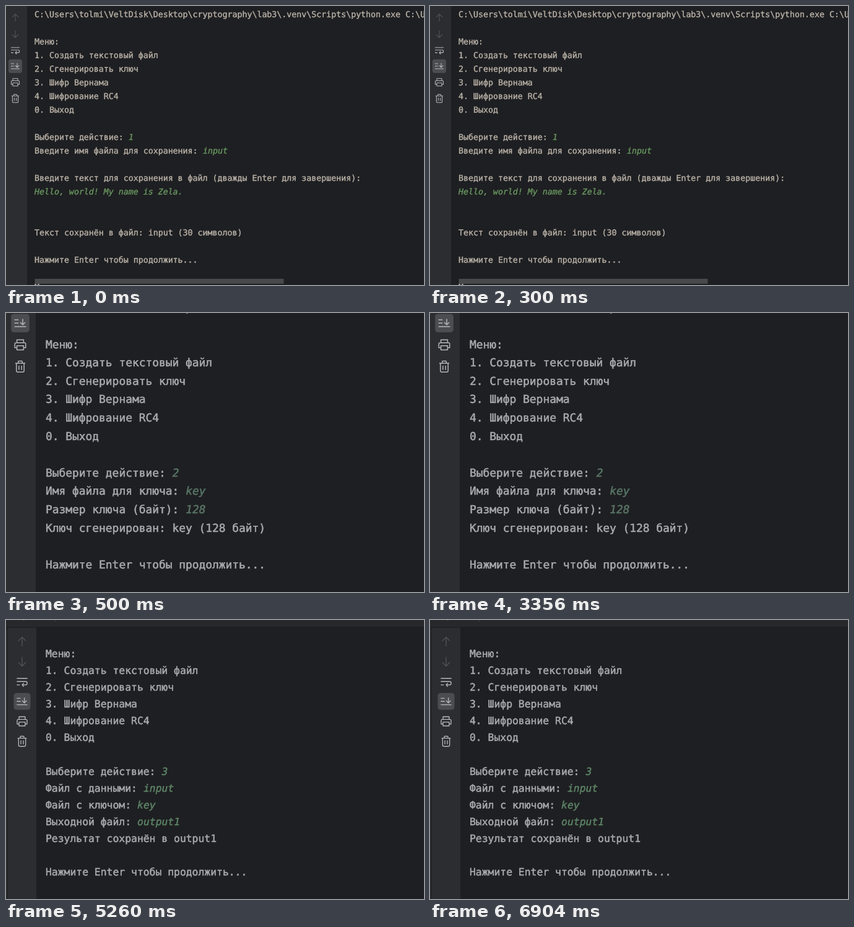
Write an HTML page with a canvas that moves like this. It is 675x450 px and loops after 8000 ms.

```html
<!DOCTYPE html>
<html lang="ru">
<head>
<meta charset="utf-8">
<title>Консоль</title>
<style>
  html, body { margin: 0; width: 100%; height: 100%; overflow: hidden; background: #1e1f22; }
  canvas { display: block; }
</style>
</head>
<body>
<canvas id="stage" width="675" height="450"></canvas>
<script>
const W = 675, H = 450, LOOP = 8000;
const ctx = document.getElementById('stage').getContext('2d');
const ADVANCE = 0.602; // monospace cell width in em
const WEIGHT = 0.03;   // extra stroke in em, for a sturdier face

const menu = [
  'Меню:',
  '1. Создать текстовый файл',
  '2. Сгенерировать ключ',
  '3. Шифр Вернама',
  '4. Шифрование RC4',
  '0. Выход',
  ''
];
const pause = 'Нажмите Enter чтобы продолжить...';
const path = String.raw`C:\Users\tolmi\VeltDisk\Desktop\cryptography\lab3\.venv\Scripts\python.exe C:\Users`;

// A line is plain text, or [prompt, typed answer].
const scenes = [
  {
    start: 0, x: 46, cell: 8, base: 17.6, step: 22,
    ink: '#b9b1a7', typed: '#67945f',
    bar: { width: 34, cx: 15, y: 19, gap: 26, scale: 1, first: 0 },
    lines: [
      path, '', ...menu,
      ['Выберите действие: ', '1'],
      ['Введите имя файла для сохранения: ', 'input'],
      '',
      'Введите текст для сохранения в файл (дважды Enter для завершения):',
      ['', 'Hello, world! My name is Zela.'],
      '', '',
      'Текст сохранён в файл: input (30 символов)',
      '', pause, '', 'Меню:'
    ],
    extra() {
      ctx.fillStyle = '#48494b';
      ctx.fillRect(46.5, 440, 402, 8);
    }
  },
  {
    start: 500, x: 64, cell: 10.77, base: -2.7, step: 29.6,
    ink: '#a8aaad', typed: '#587566',
    bar: { width: 48, cx: 23, y: 16.3, gap: 35, scale: 1.35, first: 3 },
    lines: [
      pause, '', ...menu,
      ['Выберите действие: ', '2'],
      ['Имя файла для ключа: ', 'key'],
      ['Размер ключа (байт): ', '128'],
      'Ключ сгенерирован: key (128 байт)',
      '', pause
    ]
  },
  {
    start: 5260, x: 64, cell: 9.87, base: 59.8, step: 27.13,
    ink: '#a8aaad', typed: '#5c8365',
    bar: { width: 49, cx: 26, y: 35, gap: 32.1, scale: 1.23, first: 0 },
    lines: [
      ...menu,
      ['Выберите действие: ', '3'],
      ['Файл с данными: ', 'input'],
      ['Файл с ключом: ', 'key'],
      ['Выходной файл: ', 'output1'],
      'Результат сохранён в output1',
      '', pause
    ],
    extra() {
      ctx.fillStyle = '#27282b';
      ctx.fillRect(0, 0, W, 11);
      ctx.fillStyle = '#1e1f22';
      ctx.fillRect(0, 11, W, 1.5);
      ctx.fillRect(2, 12, 1, H);
      ctx.fillStyle = '#45474a';
      ctx.fillRect(27, 0, 3, 1);
      ctx.fillRect(79, 0, 1, 2);
    }
  }
];

// Toolbar icons, drawn around their centres.
const icons = [
  'M0 6V-6M-5 -1L0 -6L5 -1',
  'M0 -6V6M-5 1L0 6L5 1',
  'M-7 -4H7M-7 0H4.5A2.2 2.2 0 0 1 4.5 4.4H0M2.3 2L0 4.4L2.3 6.8M-7 4.4H-3',
  'M-7 -4H-2M-7 0H-2M-7 4.3H7M3 -5V2M0 -1L3 2L6 -1',
  'M-4 -2.5V-6H4V-2.5M-4 3.5H-6.5V-1Q-6.5 -2.5 -5 -2.5H5Q6.5 -2.5 6.5 -1V3.5H4M-4 1H4V6H-4Z',
  'M-6 -4H6M-2.5 -4V-5.5Q-2.5 -6.5 -1.5 -6.5H1.5Q2.5 -6.5 2.5 -5.5V-4M-4.6 -4V5Q-4.6 6.7 -3 6.7H3Q4.6 6.7 4.6 5V-4M-1.6 -1V4M1.6 -1V4'
].map(d => new Path2D(d));

function drawBar({ width, cx, y, gap, scale, first }) {
  ctx.fillStyle = '#2b2d30';
  ctx.fillRect(0, 0, width, H);
  icons.slice(first).forEach((icon, i) => {
    const id = first + i;
    ctx.save();
    ctx.translate(cx, y + i * gap);
    ctx.scale(scale, scale);
    if (id === 3) {
      ctx.fillStyle = '#4b4d50';
      ctx.beginPath();
      ctx.roundRect(-11, -11, 22, 22, 3.5);
      ctx.fill();
    }
    ctx.strokeStyle = id < 2 ? '#505255' : '#b4b6ba';
    ctx.lineWidth = 1.1;
    ctx.stroke(icon);
    ctx.restore();
  });
}

function write(text, x, y, color) {
  ctx.fillStyle = ctx.strokeStyle = color;
  ctx.fillText(text, x, y);
  ctx.strokeText(text, x, y);
}

function drawText({ x, cell, base, step, ink, typed, lines }) {
  const size = cell / ADVANCE;
  const font = `${size}px "DejaVu Sans Mono", monospace`;
  ctx.textRendering = 'geometricPrecision';
  ctx.lineWidth = size * WEIGHT;
  ctx.lineJoin = 'round';
  lines.forEach((line, row) => {
    const [prompt, answer = ''] = [line].flat();
    const y = base + row * step;
    ctx.font = font;
    write(prompt, x, y, ink);
    ctx.font = 'italic ' + font;
    write(answer, x + prompt.length * cell, y, typed);
  });
}

function draw(time) {
  const scene = scenes.findLast(s => s.start <= time);
  ctx.fillStyle = '#1e1f22';
  ctx.fillRect(0, 0, W, H);
  drawBar(scene.bar);
  drawText(scene);
  scene.extra?.();
}

const begin = performance.now();
function tick() {
  draw((performance.now() - begin) % LOOP);
  requestAnimationFrame(tick);
}
tick();
</script>
</body>
</html>
```
